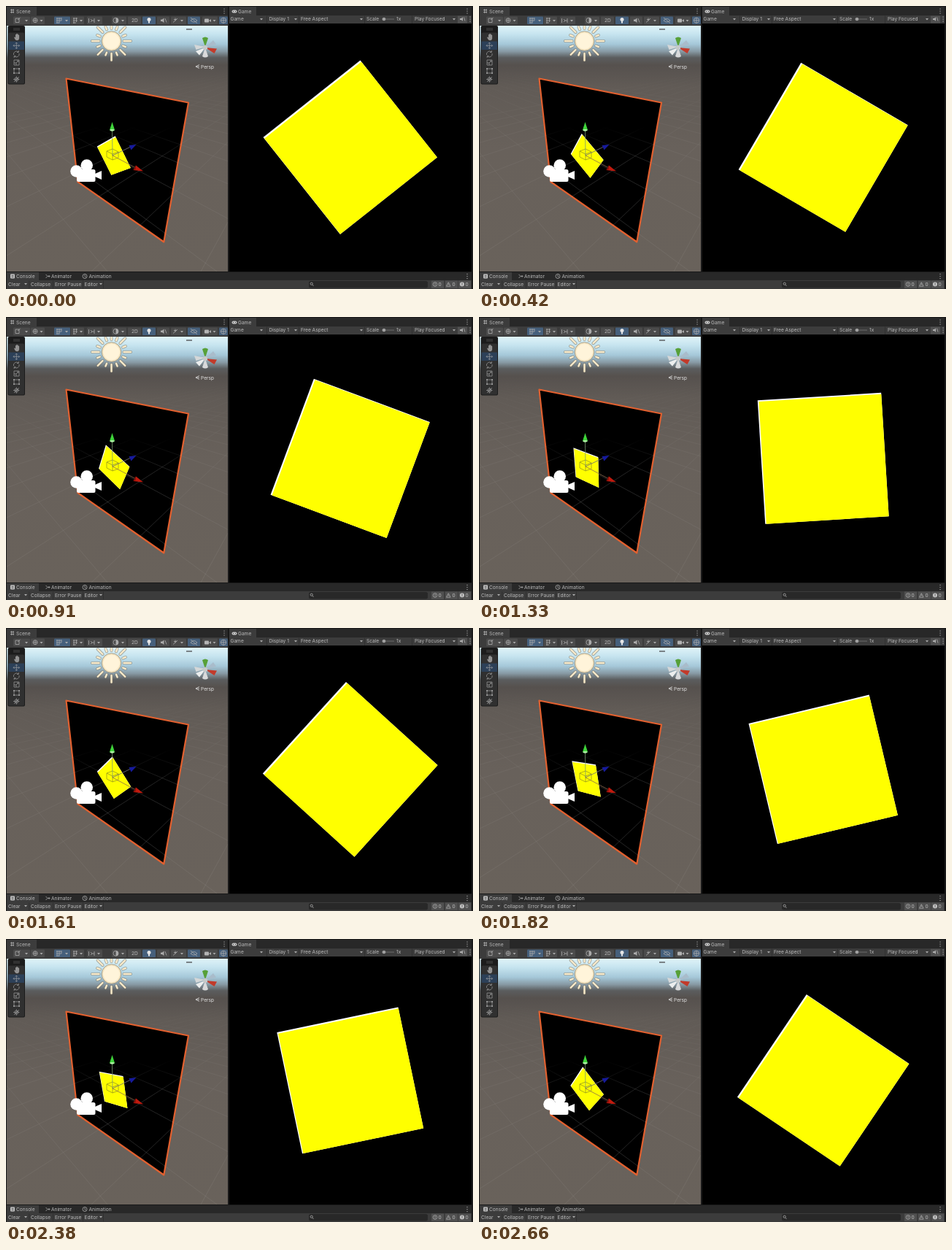
Recreate the animation shown at these times as an HTML page. Size 640x388 px, loop 2730 ms.

```html
<!DOCTYPE html>
<html lang="en">
<head>
<meta charset="utf-8">
<title>Editor with rotating square</title>
<style>
html, body { margin: 0; width: 100%; height: 100%; overflow: hidden; background: #191919; }
svg { display: block; width: 100%; height: 100%; }
text { font: 6.6px Inter, sans-serif; fill: #bdbdbd; }
.line { fill: none; stroke: #ababab; stroke-width: .8; }
.fill { fill: #ababab; }
</style>
</head>
<body>
<svg id="stage" viewBox="0 0 640 388">
  <defs>
    <linearGradient id="sky" x1="0" y1="27" x2="0" y2="364" gradientUnits="userSpaceOnUse">
      <stop offset="0" stop-color="#dff3f8"/>
      <stop offset=".035" stop-color="#c6e4ef"/>
      <stop offset=".075" stop-color="#a5c8d9"/>
      <stop offset=".105" stop-color="#8799a3"/>
      <stop offset=".13" stop-color="#5b5d5e"/>
      <stop offset=".16" stop-color="#56514e"/>
      <stop offset=".25" stop-color="#615b56"/>
      <stop offset=".5" stop-color="#68615b"/>
      <stop offset="1" stop-color="#69625b"/>
    </linearGradient>
    <linearGradient id="fade" x1="0" y1="80" x2="0" y2="364" gradientUnits="userSpaceOnUse">
      <stop offset="0" stop-color="#fff" stop-opacity="0"/>
      <stop offset=".35" stop-color="#fff" stop-opacity=".06"/>
      <stop offset="1" stop-color="#fff" stop-opacity=".09"/>
    </linearGradient>
    <linearGradient id="wallFade" x1="0" y1="165" x2="0" y2="215" gradientUnits="userSpaceOnUse">
      <stop offset="0" stop-color="#fff" stop-opacity="0"/>
      <stop offset="1" stop-color="#fff" stop-opacity=".2"/>
    </linearGradient>
    <clipPath id="view"><rect x="1" y="27" width="303" height="337"/></clipPath>
    <clipPath id="wall"><path d="M82 99L250 132L216 324L98 241Z"/></clipPath>
  </defs>
  <g id="panels"></g>
  <g id="scene" clip-path="url(#view)">
    <rect x="1" y="27" width="303" height="337" fill="url(#sky)"/>
    <g id="grid" stroke="url(#fade)" stroke-width=".7"></g>
    <g id="sun"></g>
    <path d="M82.500 99.500L250 132.500L216.300 323.500L98.300 241Z" fill="#000" stroke="#e2602f" stroke-width="2.200" stroke-linejoin="round"/>
    <g clip-path="url(#wall)"><g id="wallGrid" stroke="url(#wallFade)" stroke-width=".7"></g></g>
    <polygon id="smallWhite" fill="#fff"/>
    <polygon id="smallYellow" fill="#ff0"/>
    <g fill="none" stroke-width=".8">
      <path d="M138 199L146 196L154 200V208L146 211L138 207ZM138 199L146 203L154 200M146 203V211" stroke="#8a8a20" stroke-width=".7"/>
      <path d="M146 205L145.500 171" stroke="#7a9a70"/>
      <path d="M146 205L171 193" stroke="#6b6b78"/>
      <path d="M146 205L178 222" stroke="#8a6a50"/>
    </g>
    <path d="M145.500 159L142 170Q145.500 173 149 170Z" fill="#3fd43a"/>
    <path d="M142 170Q145.500 168 149 170Q145.500 173 142 170Z" fill="#b9efb0"/>
    <path d="M178.500 190L168.500 191L171.500 197.500Z" fill="#161a9c"/>
    <path d="M188 226.500L178 218.500L174.500 225Z" fill="#c01a0e"/>
    <path d="M178 218.500L174.500 225L177.500 224Z" fill="#7c0e08"/>
    <g fill="#fff">
      <circle cx="96.500" cy="226.500" r="8.300"/>
      <circle cx="110.700" cy="218.500" r="8.300"/>
      <rect x="97" y="224" width="25.500" height="17" rx="2.500"/>
      <path d="M122 230L131 226V238L122 234Z"/>
    </g>
    <rect x="247" y="31" width="8" height="1.800" fill="#70777b"/>
    <g id="axes">
      <path d="M273 56L258 53L260.500 60Z" fill="#d4d7d8"/>
      <path d="M273 57L260 62L265 67.500Z" fill="#eceeee"/>
      <path d="M273 57L284 47L288 52.500Z" fill="#a9bccb"/>
      <path d="M273 57L269 69Q273 72 277 69Z" fill="#d9dadb"/>
      <path d="M273 57L289 58.500L285.500 65Z" fill="#c23a2a"/>
      <path d="M273 56L269 44Q273 41 277 44Z" fill="#57a038"/>
      <path d="M270 55L273 53.500L276 55V59L273 60.500L270 59Z" fill="#c6c9ca"/>
    </g>
    <path d="M265 80.500L260 83L265 85.500M260 83H265" stroke="#dcdcdc" stroke-width=".8" fill="none"/>
    <text x="267" y="85.500" style="fill:#e4e4e4">Persp</text>
    <g id="tools"></g>
  </g>
  <rect x="306" y="24" width="332" height="340" fill="#000"/>
  <polygon id="bigWhite" fill="#fff"/>
  <polygon id="bigYellow" fill="#ff0"/>
  <g id="chrome"></g>
</svg>
<script>
const $ = id => document.getElementById(id);
const add = (id, markup) => { $(id).innerHTML += markup; };
const box = (x, y, w, h, fill, rx = 0) =>
  `<rect x="${x}" y="${y}" width="${w}" height="${h}" rx="${rx}" fill="${fill}"/>`;
const label = (x, y, s) => `<text x="${x}" y="${y}">${s}</text>`;
const line = d => `<path class="line" d="${d}"/>`;
const solid = d => `<path class="fill" d="${d}"/>`;
const ring = (x, y, r) => `<circle class="line" cx="${x}" cy="${y}" r="${r}"/>`;
const arrow = (x, y) => solid(`M${x} ${y}h4l-2 2.500z`);
const dots = (x, y) => [-3, 0, 3].map(d => box(x - .5, y + d - .5, 1.1, 1.1, '#b4b4b4')).join('');

// Panels
add('panels', [
  box(1, 1, 303, 13, '#282828'), box(1, 1, 41, 13, '#3c3c3c'), box(1, 13, 303, 14, '#3c3c3c'),
  box(306, 1, 332, 13, '#282828'), box(306, 1, 37, 13, '#3c3c3c'), box(306, 13, 332, 11, '#3c3c3c'),
  box(1, 365, 637, 11, '#282828'), box(1, 365, 44, 11, '#3c3c3c'), box(1, 376, 637, 12, '#3c3c3c')
].join(''));

// Floor grid: two families of lines, each meeting at a point on the horizon
function gridLines(first, last) {
  let s = '';
  for (let i = first; i <= last; i++) {
    s += `<path d="M-112 68L${439 + i * 150} 364M429 68L${-183 + i * 150} 364"/>`;
  }
  return s;
}
add('grid', gridLines(-6, 9));
add('wallGrid', gridLines(-2, 2));

// Sun
let rays = '';
for (let i = 0; i < 16; i++) {
  const far = i % 2 ? 21 : 26.5;
  rays += `<path d="M0 -17V-${far}" transform="translate(144.500 48) rotate(${i * 22.5})"/>`;
}
add('sun', `<g stroke="#7d7768" stroke-opacity=".6" stroke-width="4" stroke-linecap="round">${rays}</g>
  <g stroke="#fbeccb" stroke-width="2.400" stroke-linecap="round">${rays}</g>
  <circle cx="144.500" cy="48" r="13.300" fill="#f6e7c4" stroke="#8c8470" stroke-opacity=".7"/>
  <circle cx="144.500" cy="48" r="11" fill="#fff4da"/>`);

// Tool strip
add('tools', [
  box(2.5, 27, 23.5, 80.5, '#1c1c1c', 2), box(3.5, 36.5, 21.5, 70, '#303030', 1.5),
  box(3.5, 48.5, 21.5, 11.5, '#2c4058'),
  box(10, 30.5, 9, .8, '#505050'), box(10, 32.5, 9, .8, '#505050'),
  '<g opacity=".8">',
  solid('M11 43l1-.8 1 1.200v-4.400h1.300v-1.300h1.300v1.100h1.300v1h1.200v5q-.5 2.500-3 2.500-2 0-3-2z'),
  line('M10 54.300H18.500M14.300 50V58.500M11.500 52.800L10 54.300L11.500 55.800M17 52.800L18.500 54.300L17 55.800M12.800 51.500L14.300 50L15.800 51.500M12.800 57L14.300 58.500L15.800 57'),
  line('M10.500 67A4 4 0 0 1 17 63M17.300 61V63.500H15M18 65A4 4 0 0 1 11.500 69M11.200 71V68.500H13.500'),
  line('M11 74H18V81H11ZM11 78H14V81M14 78L17 75M15 75H17V77'),
  line('M11 86H18V92H11Z'),
  [[11, 86], [18, 86], [11, 92], [18, 92]].map(p => box(p[0] - 1, p[1] - 1, 2, 2, '#ababab')).join(''),
  ring(14.3, 100.5, 2.5), line('M10 100.500H18.500M14.300 96.300V104.700M11 104L18 97'),
  '</g>'
].join(''));

// Tabs, toolbars and their icons
const button = (x, w, on) => box(x, 14.5, w, 10.5, on ? '#46607c' : '#4b4b4b', 1);
const counter = (x, n) => box(x, 376.5, 17, 10.5, '#505050') + label(x + 9.5, 384, n);
add('chrome', [
  line('M6 5.500H11M6 8.500H11M7.500 4V10M10 4V10'), label(14, 10, 'Scene'), dots(299, 7),
  button(10, 23), line('M13 17H18V22.500H13ZM16 19L19.500 16'), arrow(26, 19),
  button(34, 19), ring(40, 19.7, 3), line('M37 19.700H43M40 16.700V22.700'), arrow(46.5, 19),
  button(66, 22, true), line('M69 17H76M69 20H76M69 23H73M70 16V23.500M73 16V23.500M76 16V20'), arrow(81, 19),
  button(89, 18), line('M92 17H98M92 20H98M92 23H96M93 16V24M96.500 16V22'), arrow(101, 19),
  button(111, 21), line('M113.500 17V23M116 18L118 20L116 22M121 17V23M118 20H121'), arrow(125, 19),
  button(145, 20), ring(150.5, 19.7, 3.5), solid('M150.500 16.200a3.500 3.500 0 0 1 0 7z'), arrow(158, 19),
  button(167, 18), label(172, 22.3, '2D'),
  button(187, 18, true), '<circle cx="196" cy="18.500" r="2.500" fill="#e6e6e6"/>', box(195, 20.5, 2, 3, '#e6e6e6'),
  button(207, 17), solid('M212 18.500h2l2.500-2v6.500l-2.500-2h-2z'), line('M218 17L220 22.500'),
  button(226, 21), line('M229 22.500L235 17M230 18.500H234M232 16.500V20.500'), arrow(239, 19),
  button(249, 17, true), line('M253 20Q257.500 15 262 20Q257.500 24 253 20ZM253 16L262 23.500'),
  button(269, 21), box(272, 17.5, 6, 5, '#b4b4b4', 1), solid('M278 20l3-2v4z'), arrow(283.5, 19),
  button(292, 12, true), ring(298, 19.7, 3.6), line('M294 19.700H302M298 16V23.500'),

  box(309.5, 5.5, 7, 4, '#c4c4c4', 2), box(311, 7, 1, 1, '#3c3c3c'), box(314, 7, 1, 1, '#3c3c3c'),
  label(318, 10, 'Game'), dots(632, 7),
  label(307.5, 20.3, 'Game'), arrow(348, 17), label(360.5, 20.3, 'Display 1'), arrow(395, 17),
  label(404, 20.3, 'Free Aspect'), arrow(485, 17), label(494, 20.3, 'Scale'),
  box(515, 17.5, 17, 1, '#6a6a6a'), '<circle cx="518" cy="18" r="2.300" fill="#a0a0a0"/>',
  label(535, 20.3, '1x'), label(560, 20.3, 'Play Focused'), arrow(612, 17),
  box(619, 13.5, 13, 10, '#505050'), solid('M622 17h2l2-1.700v5.500l-2-1.700h-2z'), line('M627.500 15.500L629 20.500'), dots(636, 18),
  [357, 401, 491, 556].map(x => box(x, 13.5, .7, 10.5, '#2b2b2b')).join(''),

  box(6, 367.5, 6, 6, '#c4c4c4', 1), box(7.5, 369, 3, .8, '#3c3c3c'), box(7.5, 371, 3, .8, '#3c3c3c'),
  label(14, 373, 'Console'),
  line('M54.500 368L57 370.500H60M57 370.500L54.500 373M58.500 369L60 370.500L58.500 372'), label(62, 373, 'Animator'),
  ring(108, 370.5, 3), line('M108 368.500V370.700L109.500 371.500'), label(113.5, 373, 'Animation'), dots(632, 370.5),
  label(3, 383.5, 'Clear'), arrow(25, 380), label(34, 383.5, 'Collapse'),
  label(67, 383.5, 'Error Pause'), label(107.5, 383.5, 'Editor'), arrow(128, 380),
  [31.5, 64, 105, 133].map(x => box(x, 376.5, .7, 11, '#2b2b2b')).join(''),
  box(415, 377, 163, 9.5, '#282828', 2.5), ring(418.7, 380.8, 1.6), line('M420 382.200L421.500 384'),
  counter(583, 0), counter(602, 0), counter(620, 0),
  ring(588, 381.5, 2.8), box(587.6, 379.8, .9, 2.2, '#ababab'), box(587.6, 382.5, .9, .9, '#ababab'),
  line('M603.500 384.200l2.800-5.400 2.800 5.400z'), box(605.9, 380.8, .8, 1.6, '#ababab'),
  '<circle cx="625" cy="381.500" r="3" fill="#c4c4c4"/>', box(624.6, 379.6, .9, 2.4, '#505050'), box(624.6, 382.6, .9, .9, '#505050')
].join(''));

// Unit-circle coordinates to the flat view and to the angled view
const flat = (u, v) => [471.7 + 120 * u, 193.8 + 120 * v];
const angled = (u, v) => {
  const w = 1 - .049 * u + .055 * v;
  return [146.8 + 23.2 * u / w, 206.6 + (11.6 * u + 28.2 * v) / w];
};

const HALF = Math.SQRT1_2;

// The yellow face is the white square overlapped with a copy moved down and right
function drawSquare(name, project, shift, turn) {
  const c = Math.cos(turn), s = Math.sin(turn);
  const outline = (x0, y0, x1, y1) => [[x0, y0], [x1, y0], [x1, y1], [x0, y1]]
    .map(([x, y]) => project(x * c - y * s, x * s + y * c).map(n => n.toFixed(2)).join()).join(' ');
  const dx = shift * (c + s), dy = shift * (c - s);
  $(name + 'White').setAttribute('points', outline(-HALF, -HALF, HALF, HALF));
  $(name + 'Yellow').setAttribute('points', outline(
    -HALF + Math.max(dx, 0), -HALF + Math.max(dy, 0),
    HALF + Math.min(dx, 0), HALF + Math.min(dy, 0)));
}

const LOOP = 2730, STEP = 70;

function draw(ms) {
  const n = Math.floor((ms % LOOP) / STEP);
  const lag = n < 14 ? 0 : 2.7; // one slow step
  const turn = (51.6 + 11.45 * n - lag) * Math.PI / 180;
  drawSquare('big', flat, .014, turn);
  drawSquare('small', angled, .035, turn);
}

let start;
function tick(now) {
  start ??= now;
  draw(now - start);
  requestAnimationFrame(tick);
}
draw(0);
requestAnimationFrame(tick);
</script>
</body>
</html>
```
